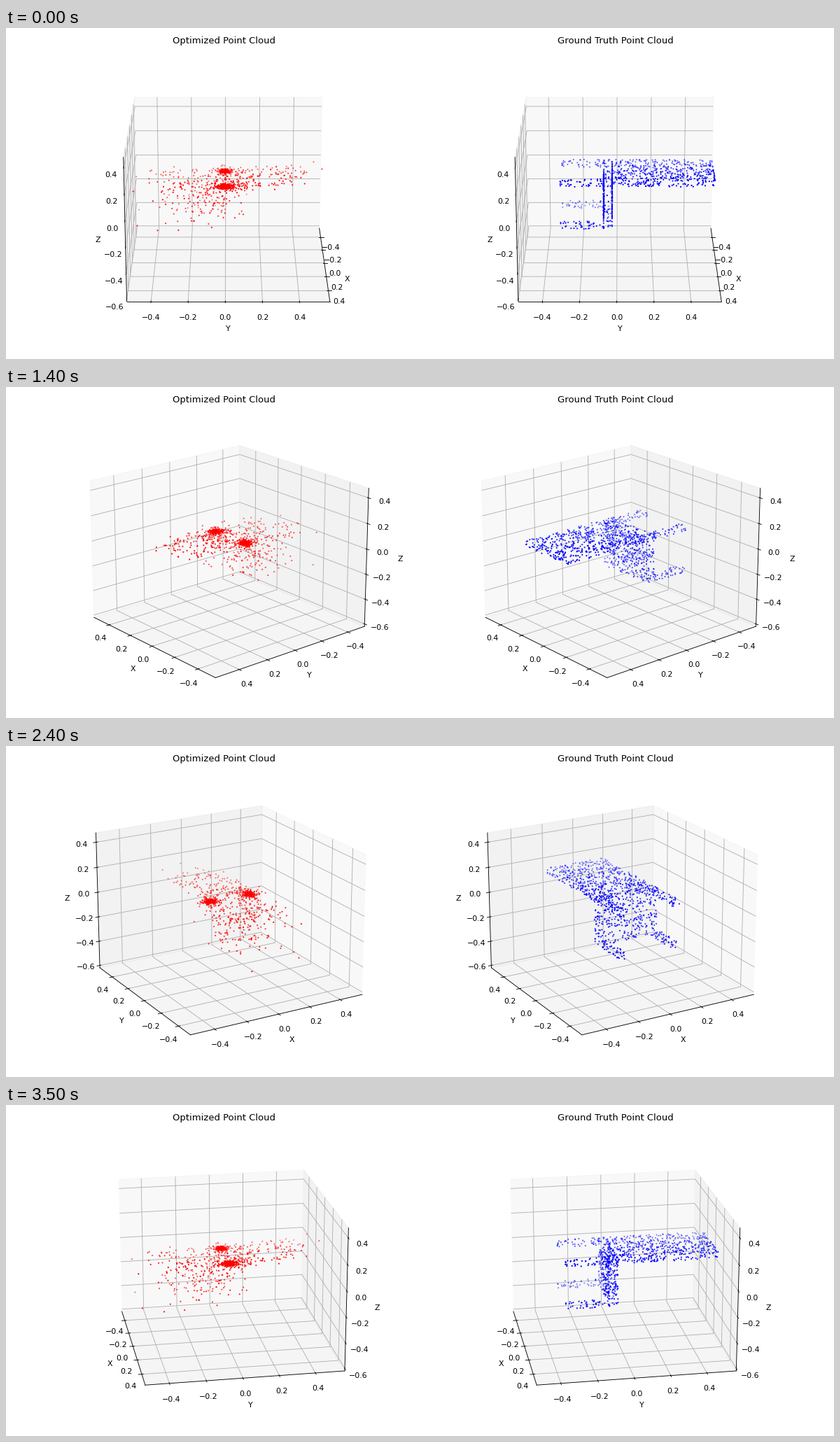
Write a matplotlib script that moves like this. It is 1183x473 px and loops after 3600 ms.

```python
import numpy as np
import matplotlib.pyplot as plt
from matplotlib.animation import FuncAnimation

WIDTH, HEIGHT, DPI = 1183, 473, 78.875
FRAMES, INTERVAL = 36, 100
CENTER = (0.0, 0.0165, -0.0727)
HALF_RANGE = 0.5469

rng = np.random.default_rng(7)


def box_surface(lo, hi, density):
    """Random points spread evenly over the faces of a box."""
    lo, hi = np.array(lo), np.array(hi)
    size = hi - lo
    faces = []
    for axis in range(3):
        area = np.prod(np.delete(size, axis))
        for side in (lo, hi):
            points = rng.uniform(lo, hi, (round(area * density), 3))
            points[:, axis] = side[axis]
            faces.append(points)
    return np.vstack(faces)


def chair_points(density=1050):
    half, low, high, thick = 0.187, -0.248, 0.125, 0.042
    parts = [
        box_surface((-half, -0.074, low), (half, -0.027, high), density),
        box_surface((-half, -0.027, high - thick), (half, 0.54, high), density),
    ]
    for x in (-half, half - thick):
        for z in (low, high - thick):
            parts.append(box_surface((x, -0.312, z),
                                     (x + thick, -0.074, z + thick), density))
    return np.vstack(parts)


def fitted_points():
    parts = []
    for x in (-0.125, 0.125):
        core = (x, 0.0, 0.058)
        parts.append(rng.normal(core, (0.016, 0.018, 0.006), (200, 3)))
        parts.append(rng.normal(core, (0.030, 0.045, 0.014), (50, 3)))

    def slab(count, half, y, z):
        parts.append(np.column_stack([rng.uniform(-half, half, count), y, z]))

    n = 165
    y = 0.46 * rng.random(n) ** 1.4
    slab(n, 0.17, y, 0.055 + 0.09 * y + rng.normal(0, 0.018, n))
    n = 100
    y = -0.43 * rng.random(n) ** 1.3
    slab(n, 0.18, y, 0.045 + rng.normal(0, 0.025, n))
    n = 165
    z = rng.uniform(-0.25, 0.03, n)
    y = np.clip(-0.09 + 0.25 * z + rng.normal(0, 0.11, n), -0.4, 0.12)
    slab(n, 0.17, y, z)

    parts.append(np.array([
        (-0.02, 0.54, 0.125), (-0.16, 0.50, 0.118), (-0.16, -0.508, 0.0),
        (0.15, -0.508, 0.03), (-0.15, -0.495, -0.263), (0.15, -0.49, -0.24),
        (0.19, -0.375, -0.257), (0.18, -0.26, -0.26),
    ]))
    return np.vstack(parts)


def cloud_axes(left, title, points, color):
    rect = (left / WIDTH, 11.83 / HEIGHT, 600 / WIDTH, 432.7 / HEIGHT)
    ax = fig.add_axes(rect, projection="3d")
    ax.scatter(*points.T, c=color, s=1)
    for name, mid in zip("xyz", CENTER):
        ax.set(**{f"{name}lim": (mid - HALF_RANGE, mid + HALF_RANGE),
                  f"{name}label": name.upper()})
    ax.set_title(title)
    return ax


fig = plt.figure(figsize=((WIDTH + 0.01) / DPI, (HEIGHT + 0.01) / DPI), dpi=DPI)
axes = [
    cloud_axes(11.83, "Optimized Point Cloud", fitted_points(), "red"),
    cloud_axes(571.2, "Ground Truth Point Cloud", chair_points(), "blue"),
]


def update(frame):
    for ax in axes:
        ax.view_init(elev=20, azim=frame * 360 / FRAMES)
    return axes


anim = FuncAnimation(fig, update, frames=FRAMES, interval=INTERVAL, repeat=True)
plt.show()
```
